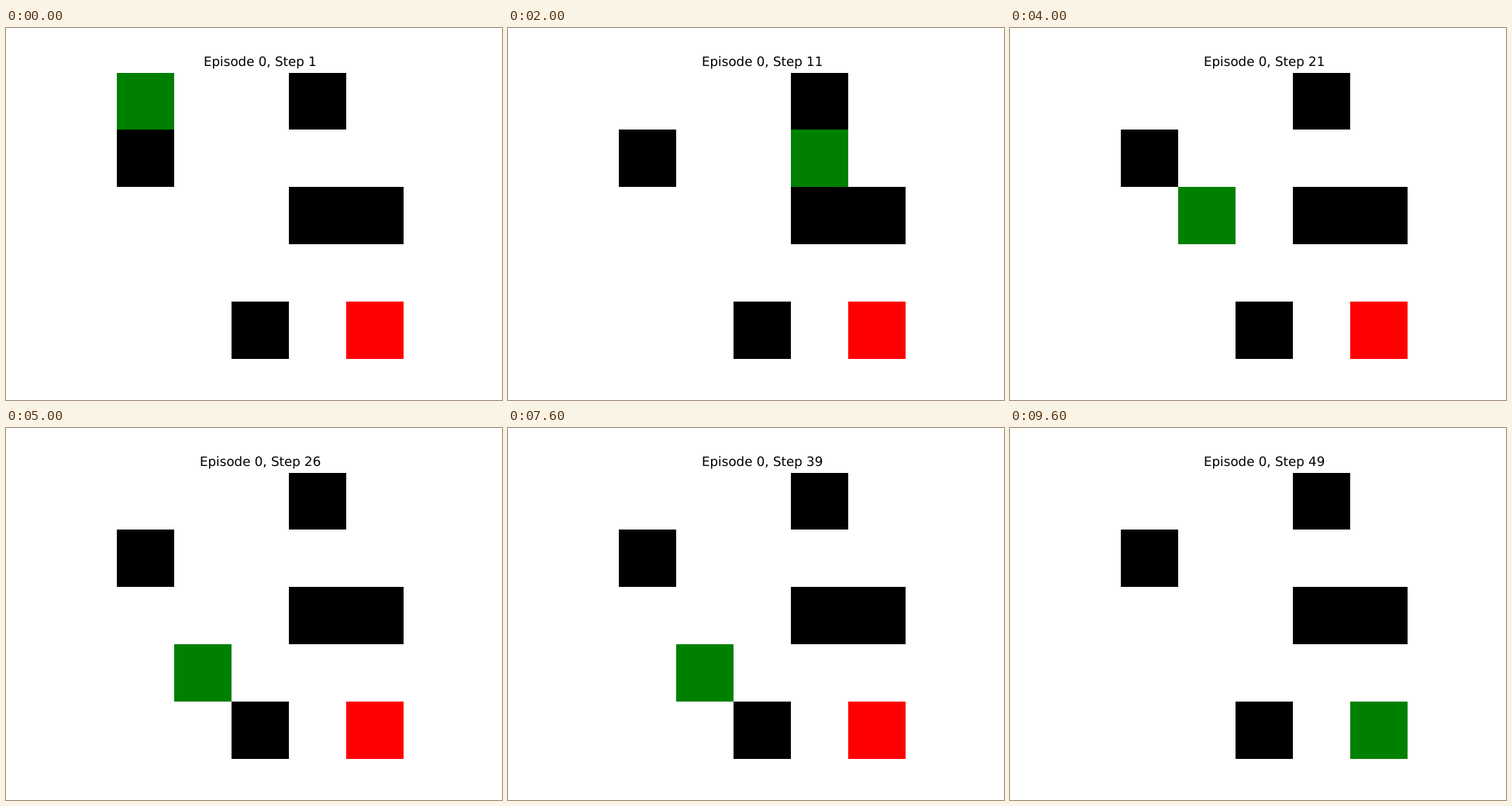
Animation of 640 by 480 pixels, one loop 9800 ms. Source, as an HTML page with a canvas:

```html
<!DOCTYPE html>
<html lang="en">
<head>
<meta charset="utf-8">
<title>Grid walk</title>
<style>
  html, body { margin: 0; width: 100%; height: 100%; overflow: hidden; background: #fff; }
  canvas { display: block; }
</style>
</head>
<body>
<canvas id="stage" width="640" height="480"></canvas>
<script>
const ctx = document.getElementById("stage").getContext("2d");
const STEP_MS = 200;
const CELL = 74;
const LEFT = 143;
const TOP = 57;
const CENTER_X = 328;

const at = (col, row) => ({ col, row });
const walls = [at(3, 0), at(0, 1), at(3, 2), at(4, 2), at(2, 4)];
const goal = at(4, 4);

// Places the agent reaches, with the step on which it arrives.
const stops = [
  { step: 11, ...at(3, 1) },
  { step: 18, ...at(1, 4) },
  { step: 21, ...at(1, 2) },
  { step: 24, ...at(0, 3) },
  { step: 26, ...at(1, 3) },
  { step: 31, ...at(0, 4) },
  { step: 39, ...at(1, 3) },
  { step: 41, ...at(2, 3) },
  { step: 49, ...goal }
];

const isWall = ({ col, row }) => walls.some(w => w.col === col && w.row === row);

// Moves one cell along the longer remaining axis, or the other if a wall is there.
function advance({ col, row }, target) {
  const dx = target.col - col;
  const dy = target.row - row;
  const across = at(col + Math.sign(dx), row);
  const down = at(col, row + Math.sign(dy));
  const [first, second] = Math.abs(dx) >= Math.abs(dy) ? [across, down] : [down, across];
  return isWall(first) ? second : first;
}

// The agent waits at each stop and leaves just in time for the next one.
function walk() {
  const path = [at(0, 0)];
  for (const stop of stops) {
    while (path.length < stop.step) {
      const here = path[path.length - 1];
      const distance = Math.abs(stop.col - here.col) + Math.abs(stop.row - here.row);
      const mustMove = stop.step - path.length <= distance;
      path.push(mustMove ? advance(here, stop) : here);
    }
  }
  return path;
}
const path = walk();

function fillCell({ col, row }, color) {
  const y = TOP + row * CELL;
  const top = Math.max(y, TOP + 1);
  ctx.fillStyle = color;
  ctx.fillRect(LEFT + col * CELL, top, CELL, y + CELL - top);
}

function drawTitle(text) {
  ctx.fillStyle = "#000";
  ctx.font = '16.6667px "DejaVu Sans", sans-serif';
  ctx.textRendering = "geometricPrecision";
  const x = Math.round(CENTER_X - ctx.measureText(text).width / 2);
  ctx.fillText(text, x, 49);
}

function draw(index) {
  ctx.fillStyle = "#fff";
  ctx.fillRect(0, 0, 640, 480);
  walls.forEach(cell => fillCell(cell, "#000"));
  fillCell(goal, "#f00");
  fillCell(path[index], "#008000");
  drawTitle(`Episode 0, Step ${index + 1}`);
}

const start = performance.now();
function tick() {
  const elapsed = Math.max(0, performance.now() - start);
  draw(Math.floor(elapsed / STEP_MS) % path.length);
  requestAnimationFrame(tick);
}
tick();
</script>
</body>
</html>
```
